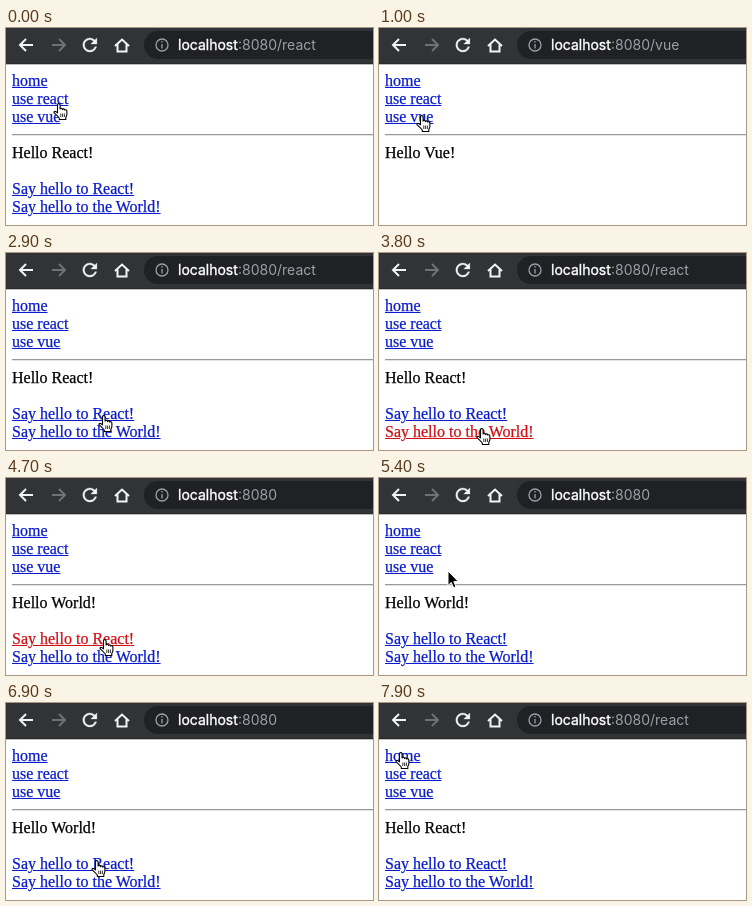
These frames come from a looping animation (367 px wide and 197 px high, 8000 ms). An HTML page:

```html
<!DOCTYPE html>
<html lang="en">
<head>
<meta charset="utf-8">
<title>Micro frontend demo</title>
<style>
  html, body { margin: 0; width: 100%; height: 100%; overflow: hidden; background: #fff; }
  #stage { position: relative; width: 367px; height: 197px; overflow: hidden; }
  svg { position: absolute; left: 0; top: 0; }
  .url { font: 14px Inter, Roboto, sans-serif; }
  .line {
    position: absolute; left: 6px; white-space: nowrap; color: #000;
    font: 16px/18px "Liberation Serif", "Times New Roman", serif;
    -webkit-text-stroke: .25px currentColor;
  }
  .link { color: #0a1ccc; text-decoration: underline; }
  .link.active { color: #d01014; }
  hr {
    position: absolute; left: 6px; top: 106px; width: 380px; height: 0; margin: 0; border: 0;
    border-top: 1px solid #999; border-bottom: 1px solid #e4e4e4;
  }
</style>
</head>
<body>
<div id="stage">
  <svg width="367" height="197" fill="none">
    <rect width="367" height="36" fill="#323337"/>
    <rect y="35.3" width="367" height="1" fill="#28292c"/>
    <rect x="138" y="3" width="260" height="28" rx="14" fill="#202124"/>
    <g stroke="#f1f3f4" stroke-width="2">
      <path d="M27 17H14.500M20 11l-6 6 6 6"/>
      <path d="M46 17h12.500M53 11l6 6-6 6" stroke="#707175"/>
      <path d="M109 18l7-6.500 7 6.500M111.500 16v7.500h9V16"/>
    </g>
    <path transform="translate(73.3 6.400) scale(.88)" fill="#f1f3f4" stroke="#f1f3f4" stroke-width=".3" d="M17.650 6.350A7.960 7.960 0 0 0 12 4c-4.420 0-8 3.580-8 8s3.580 8 8 8c3.730 0 6.840-2.550 7.730-6h-2.080A6 6 0 0 1 12 18c-3.310 0-6-2.690-6-6s2.690-6 6-6c1.660 0 3.140.690 4.220 1.780L13 11h7V4z"/>
    <g stroke="#9aa0a6" stroke-width="1.3">
      <circle cx="156" cy="17" r="6"/>
      <path d="M156 16v4.500M156 13v1.500"/>
    </g>
    <text class="url" x="172" y="22" fill="#fff" stroke="#fff" stroke-width=".35">localhost</text>
    <text class="url" id="path" x="232" y="22" fill="#9aa0a6"></text>
  </svg>
  <div id="page"><hr></div>
  <svg width="367" height="197">
    <g id="hand" fill="#fff" stroke="#000" stroke-width="1.1" stroke-linejoin="round">
      <path d="M-.5 8.800V1Q-.500-.400.800-.400T2.100 1V5Q2.100 4.200 3.200 4.200T4.500 5.600Q4.600 4.800 5.600 4.900T6.800 6.200Q7 5.600 7.900 5.800T8.900 7.200V10Q8.900 12 7.800 13.400V15.500H1.300V14Q-1 11.400-3.600 9.200Q-4.400 8-3.500 7.500Q-2.500 7-.500 8.800Z"/>
      <path d="M2.800 9.500v3.500m1.800-3.500v3.500m1.800-3.500v3.500" stroke-width=".8"/>
    </g>
    <path id="arrow" d="M0 0V14.500L3.300 11.500L5.600 16.700L8 15.600L5.800 10.600H10.300Z" stroke="#fff"/>
  </svg>
</div>
<script>
const LOOP = 8000, STEP = 100, CLICK = 100;
const $ = id => document.getElementById(id);

function addLine(text, top, cls = "") {
  const el = document.createElement("div");
  el.className = "line " + cls;
  el.style.top = top + "px";
  el.textContent = text;
  $("page").append(el);
  return el;
}

const addLink = (text, top, goal) => ({ top, goal, el: addLine(text, top, "link") });
const home = addLink("home", 44, "World");
const useReact = addLink("use react", 62, "React");
const useVue = addLink("use vue", 80, "Vue");
const sayReact = addLink("Say hello to React!", 152, "React");
const sayWorld = addLink("Say hello to the World!", 170, "World");
const links = [home, useReact, useVue, sayReact, sayWorld];
const greeting = addLine("", 116);

// Each hop glides to a point, then may click a link after a short wait
const hop = (start, end, x, y, link, wait = 100) => ({ start, end, x, y, link, press: end + wait });
const hops = [
  hop(0, 500, 42, 88, useVue, 200),
  hop(1700, 2000, 58, 70, useReact, 0),
  hop(2300, 2900, 97, 163, sayReact, 300),
  hop(3300, 3600, 102, 176, sayWorld),
  hop(4300, 4600, 98, 162, sayReact),
  hop(4800, 5000, 102, 176, sayWorld),
  hop(5200, 5400, 69, 93),
  hop(5400, 5800, 23, 51, home, 200),
  hop(6400, 6900, 90, 158, sayReact, 200),
  hop(7200, 7900, 21, 50)
];

const easeOut = k => 1 - (1 - k) ** 2;

function stateAt(t) {
  const s = { x: 52, y: 76, name: "React", held: null };
  for (const h of hops) {
    if (t < h.start) break;
    const k = easeOut(Math.min(1, (t - h.start) / (h.end - h.start)));
    s.x += (h.x - s.x) * k;
    s.y += (h.y - s.y) * k;
    if (!h.link || t < h.press) continue;
    const hold = h.link === sayWorld ? 2 * CLICK : CLICK;
    if (t < h.press + hold) s.held = h.link;
    else s.name = h.link.goal;
  }
  return s;
}

function render(t) {
  const { x, y, name, held } = stateAt(t);
  let over = false;

  $("path").textContent = ":8080" + (name === "World" ? "" : "/" + name.toLowerCase());
  greeting.textContent = `Hello ${name}!`;
  for (const link of links) {
    const { top, el } = link;
    const shown = name !== "Vue" || top < 100;
    el.style.visibility = shown ? "visible" : "hidden";
    el.classList.toggle("active", held === link);
    if (shown && y >= top && y < top + 18 && x >= 6 && x < 6 + el.offsetWidth) over = true;
  }

  for (const id of ["hand", "arrow"]) {
    $(id).setAttribute("transform", `translate(${Math.round(x)} ${Math.round(y)})`);
    $(id).style.display = (id === "hand") === over ? "" : "none";
  }
}

const start = performance.now();
let last = -1;
function tick() {
  const t = Math.floor((performance.now() - start) % LOOP / STEP) * STEP;
  if (t !== last) render(last = t);
  requestAnimationFrame(tick);
}
tick();
</script>
</body>
</html>
```
